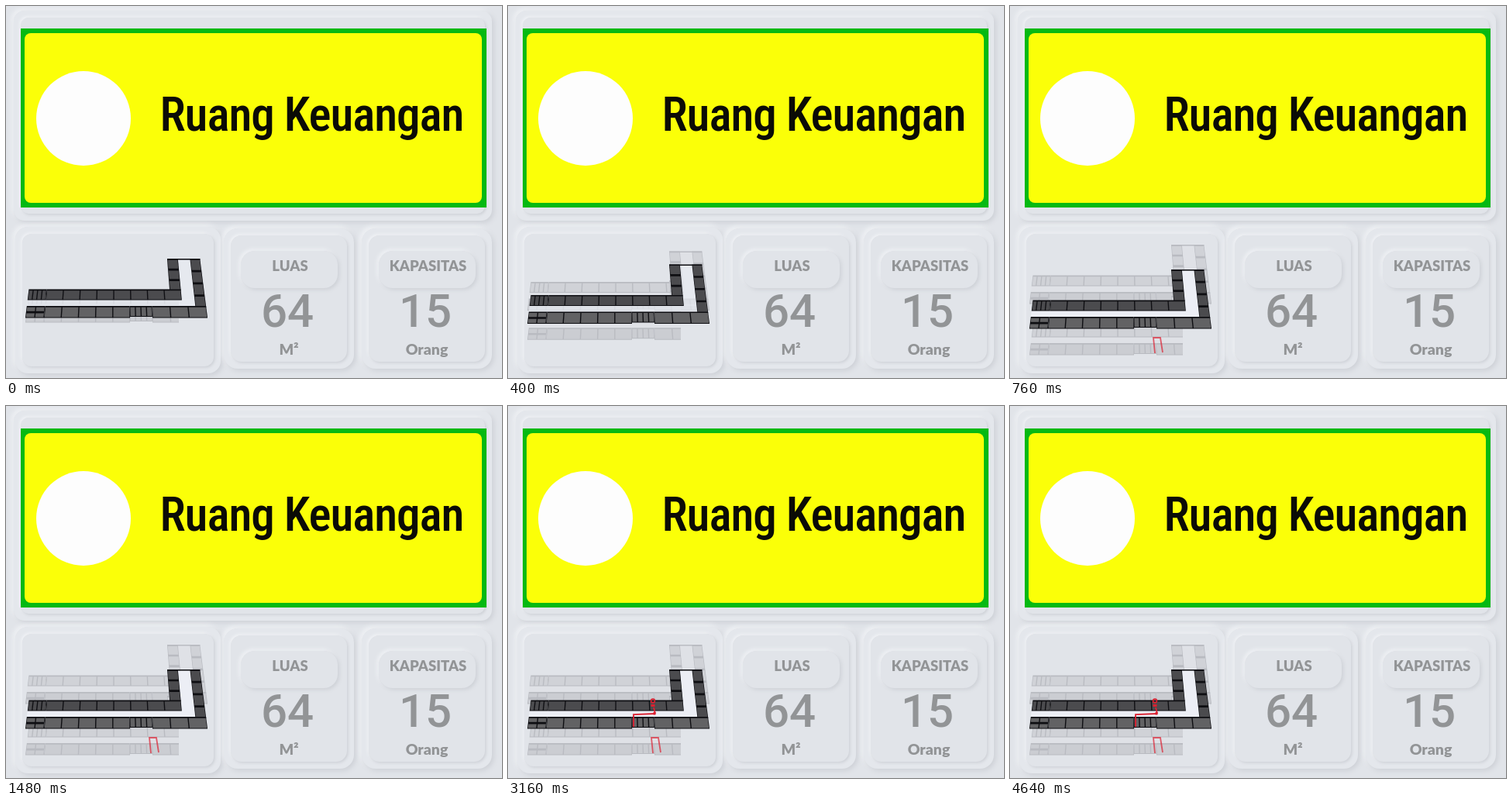
An HTML page with a canvas for the animation above (5120 ms loop, 640 by 480 pixels).

```html
<!DOCTYPE html>
<html lang="id">
<head>
<meta charset="utf-8">
<title>Ruang Keuangan</title>
<style>
  html, body { margin: 0; width: 100%; height: 100%; overflow: hidden; background: #e1e4e9; }
  canvas { display: block; }
</style>
</head>
<body>
<canvas id="stage" width="640" height="480"></canvas>
<script>
const LOOP = 5120;
const SPREAD = 760;
const BASE = "#e1e4e9";
const RED = "#dc2030";
const DARK = { wall: "#0e0e12", back: "#4b4b4e", front: "#626264", hall: "#eceef5" };
const GHOST = { wall: "#b9bbc1", back: "#d0d2d7", front: "#cbcdd2", hall: "#dfe1e6" };

const ctx = document.getElementById("stage").getContext("2d");
const backdrop = document.createElement("canvas");
backdrop.width = 640;
backdrop.height = 480;

const clamp = v => Math.max(0, Math.min(1, v));
const span = (t, from, to) => clamp((t - from) / (to - from));

// Soft raised surface: light from the upper left, shade at the lower right.
function raised(c, x, y, w, h, r, depth, fill) {
  for (const [offset, color] of [[-depth, "#f2f4f7"], [depth, "#cdd0d6"]]) {
    c.save();
    c.shadowColor = color;
    c.shadowBlur = depth * 2.5;
    c.shadowOffsetX = c.shadowOffsetY = offset;
    c.fillStyle = fill;
    c.beginPath();
    c.roundRect(x, y, w, h, r);
    c.fill();
    c.restore();
  }
}

function panel(c, x, y, w, h, r) {
  raised(c, x, y, w, h, r, 2.5, "#e4e7ec");
  raised(c, x + 9, y + 9, w - 18, h - 18, r - 4, 1.5, BASE);
}

function label(c, text, x, y, font, color = "#929496") {
  c.font = font;
  c.fillStyle = color;
  c.fillText(text, x, y);
}

function drawBanner(c) {
  c.fillStyle = "#05b912";
  c.fillRect(19, 29, 601, 231);
  c.fillStyle = "#fbff08";
  c.beginPath();
  c.roundRect(24, 35, 590, 219, 8);
  c.fill();

  c.fillStyle = "#fdfdfd";
  c.beginPath();
  c.arc(100, 145, 61, 0, Math.PI * 2);
  c.fill();

  c.save();
  c.fontStretch = "condensed";
  c.letterSpacing = "-1px";
  label(c, "Ruang Keuangan", 394.5, 161, '500 61px "Roboto Condensed", Roboto, sans-serif', "#0b0b06");
  c.restore();
}

function drawCard(c, x, title, value, unit) {
  panel(c, x - 84, 287, 168, 181, 18);
  raised(c, x - 62, 316, 125, 48, 18, 2, BASE);
  label(c, title, x + 1.5, 342, "900 18.5px Lato, sans-serif");
  label(c, value, x - 2, 414, "500 60px Roboto, sans-serif");
  label(c, unit, x, 450, "900 19.5px Lato, sans-serif");
}

function drawBackdrop(c) {
  c.fillStyle = BASE;
  c.fillRect(0, 0, 640, 480);
  c.textAlign = "center";
  panel(c, 10, 6, 617, 271, 14);
  panel(c, 12, 285, 265, 189, 16);
  drawCard(c, 365, "LUAS", "64", "M²");
  drawCard(c, 543, "KAPASITAS", "15", "Orang");
  drawBanner(c);
}

// Perspective: the plan widens towards the viewer around x = 140.
const project = (x, y) => [140 + (x - 140) * (1 + 0.00107 * (y - 416)), y];

function slab(c, x0, x1, y0, y1, color) {
  c.fillStyle = color;
  c.beginPath();
  c.moveTo(...project(x0, y0));
  c.lineTo(...project(x1, y0));
  c.lineTo(...project(x1, y1));
  c.lineTo(...project(x0, y1));
  c.fill();
}

// A walled block divided evenly into rooms.
function block(c, x0, x1, y0, y1, cols, rows, wall, room) {
  const w = (x1 - x0) / cols, h = (y1 - y0) / rows;
  slab(c, x0, x1, y0, y1, wall);
  for (let i = 0; i < cols; i++) {
    for (let j = 0; j < rows; j++) {
      const x = x0 + i * w, y = y0 + j * h;
      slab(c, x + 0.7, x + w - 0.7, y + 1.7, y + h - 1, room);
    }
  }
}

function drawFloor(c, dy, { wall, back, front, hall }, hallAlpha = 1) {
  c.save();
  c.translate(0, dy);
  c.globalAlpha = hallAlpha;
  slab(c, 25, 246, 392, 402, hall);
  slab(c, 229, 247, 342, 393, hall);
  c.globalAlpha = 1;

  // Tower, rear wing, front wing
  block(c, 214, 229, 340, 381, 1, 3, wall, back);
  block(c, 246, 260, 340, 403, 1, 4, wall, back);
  slab(c, 214, 260, 340, 341.5, wall);
  block(c, 25, 49, 379.5, 393.5, 4, 1, wall, back);
  block(c, 49, 229, 379.5, 393.5, 8, 1, wall, back);
  block(c, 25, 49, 401, 416.5, 2, 2, wall, front);
  block(c, 49, 160, 401, 416.5, 5, 1, wall, front);
  block(c, 160, 189, 401, 415, 4, 1, wall, front);
  block(c, 189, 260, 401, 416.5, 3, 1, wall, front);
  c.restore();
}

// A line made of steps [dx, dy], revealed along its length.
function route(c, x, y, steps, progress, alpha = 1) {
  let left = progress * steps.reduce((sum, s) => sum + Math.hypot(...s), 0);
  if (!left) return;
  c.save();
  c.globalAlpha = alpha;
  c.strokeStyle = RED;
  c.lineWidth = 1.8;
  c.beginPath();
  c.moveTo(x, y);
  for (const [dx, dy] of steps) {
    const length = Math.hypot(dx, dy);
    const k = clamp(left / length);
    c.lineTo(x += dx * k, y += dy * k);
    left -= length;
    if (left <= 0) break;
  }
  c.stroke();
  c.restore();
}

function drawMarker(c, alpha) {
  c.save();
  c.globalAlpha = alpha;
  c.strokeStyle = c.fillStyle = RED;
  c.lineWidth = 1.6;
  c.beginPath();
  c.arc(187, 380.5, 2.4, 0, Math.PI * 2);
  c.stroke();
  c.fillRect(184.5, 385, 5, 3);
  c.restore();
}

function draw(t) {
  const p = span(t, 0, SPREAD);
  const moving = t > 0 && p < 1;
  ctx.drawImage(backdrop, 0, 0);

  if (p > 0) drawFloor(ctx, -14 - 18 * p, GHOST);

  // The lowest floor has no tower.
  ctx.save();
  ctx.beginPath();
  ctx.rect(20, 300, 203, 170);
  ctx.clip();
  drawFloor(ctx, -8 + 42 * p, GHOST);
  ctx.restore();

  route(ctx, 187, 448, [[-2, -20], [9, 0], [3, 19]], span(t, 590, 760), 0.7);
  drawFloor(ctx, 14 * (p - 1), DARK, moving ? 0.6 : 1);

  const across = span(t, 1640, 2080);
  route(ctx, 162, 414, [[0, -16], [28, -1]], across);
  if (across === 1) {
    ctx.fillStyle = RED;
    ctx.fillRect(187.5, 395, 3, 3.5);
  }
  route(ctx, 190, 397, [[-2, -8]], span(t, 2420, 2560));
  drawMarker(ctx, span(t, 2940, 3160));
}

drawBackdrop(backdrop.getContext("2d"));
const start = performance.now();
function tick() {
  draw((performance.now() - start) % LOOP);
  requestAnimationFrame(tick);
}
draw(0);
requestAnimationFrame(tick);
</script>
</body>
</html>
```
